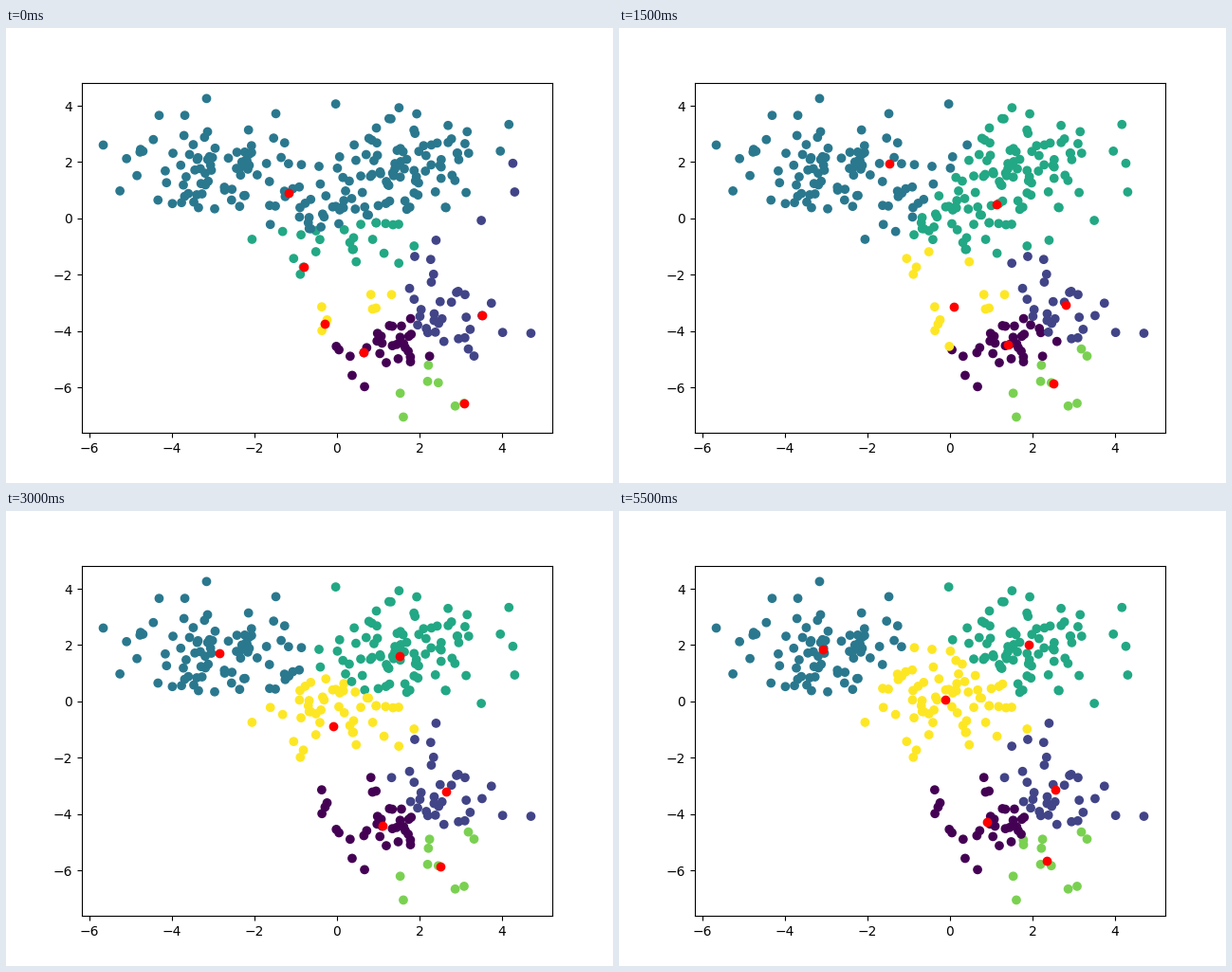
Animation, 640 px wide and 480 px high, one loop 6000 ms. Source, as a matplotlib script:

```python
import numpy as np
import matplotlib.pyplot as plt
from matplotlib.animation import FuncAnimation

STEPS = 12
STEP_MS = 500
BLOB_CENTERS = [(0, 0), (2, 2), (-3, 2), (2, -4)]
POINTS_PER_BLOB = 75
# Each cluster starts at the data point closest to its seed.
SEEDS = np.array([(0.65, -4.76), (3.52, -3.44), (-1.16, 0.90),
                  (-0.81, -1.73), (3.09, -6.57), (-0.29, -3.74)])


def make_blobs():
    rng = np.random.RandomState(0)
    points = np.concatenate([rng.normal(center, 1.0, (POINTS_PER_BLOB, 2))
                             for center in BLOB_CENTERS])
    order = np.arange(len(points))
    rng.shuffle(order)
    return points[order]


def nearest(points, targets):
    """Index of the closest target for every point."""
    gaps = points[:, None, :] - targets[None, :, :]
    return (gaps ** 2).sum(axis=2).argmin(axis=1)


def lloyd_steps(points, centers, count):
    steps = []
    for _ in range(count):
        labels = nearest(points, centers)
        steps.append((centers, labels))
        centers = np.array([points[labels == k].mean(axis=0)
                            for k in range(len(centers))])
    return steps


data = make_blobs()
steps = lloyd_steps(data, data[nearest(SEEDS, data)], STEPS)

fig, ax = plt.subplots(figsize=(6.4, 4.8), dpi=100)
first_centers, first_labels = steps[0]
dots = ax.scatter(data[:, 0], data[:, 1], c=first_labels, cmap="viridis",
                  vmin=0, vmax=len(SEEDS) - 1)
markers = ax.scatter(first_centers[:, 0], first_centers[:, 1], c="r")


def update(index):
    centers, labels = steps[index]
    dots.set_array(labels)
    markers.set_offsets(centers)
    return dots, markers


animation = FuncAnimation(fig, update, frames=STEPS, interval=STEP_MS,
                          repeat=True, repeat_delay=0)
plt.show()
```
